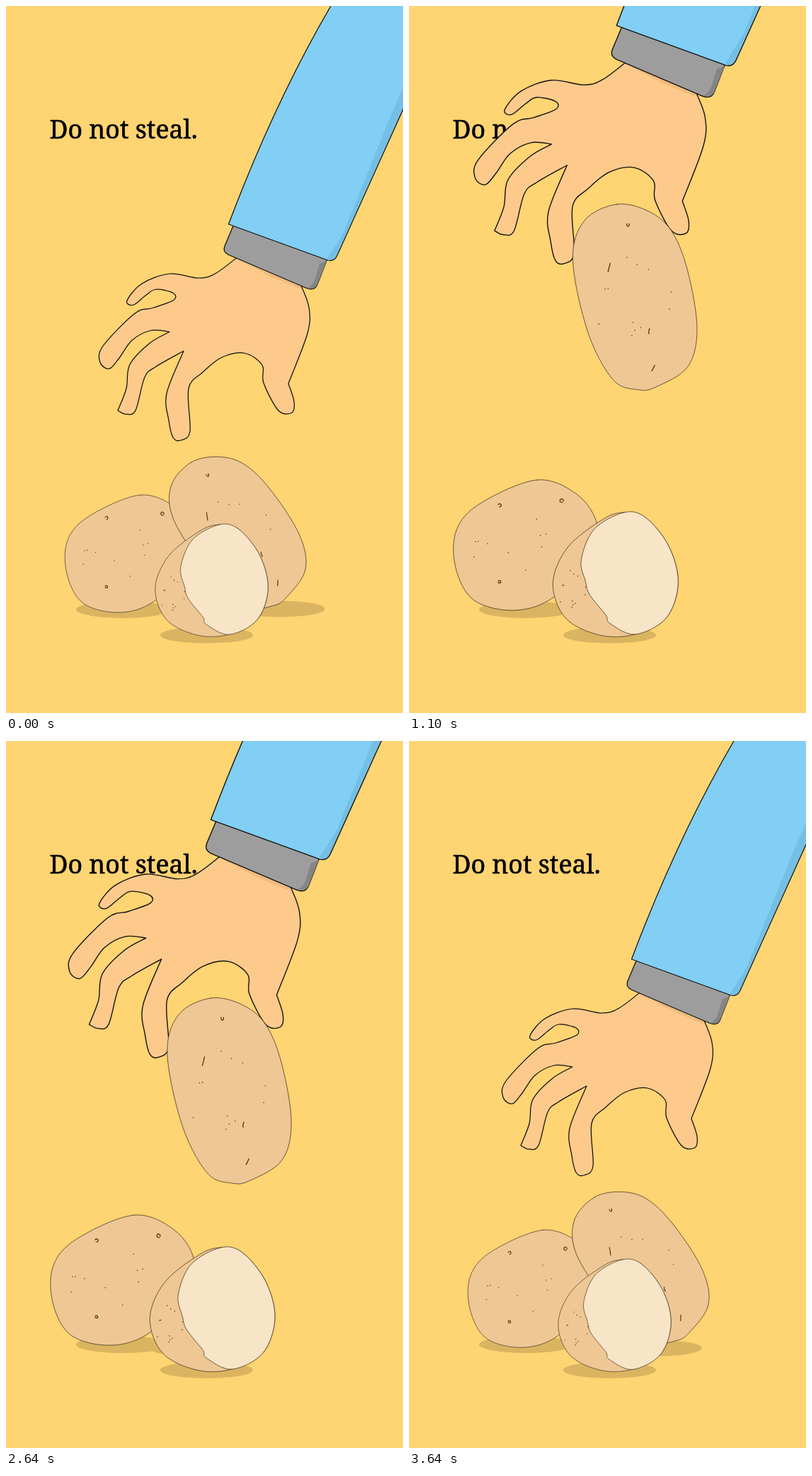
An HTML page that plays this animation: 561x998 px, repeating every 3.74 s.

```html
<!DOCTYPE html>
<html lang="en">
<head>
<meta charset="utf-8">
<title>Do not steal.</title>
<style>
html, body { margin: 0; height: 100%; overflow: hidden; background: #ffd472; }
svg { display: block; width: 100vw; height: 100vh; }
text { font: 35.7px "Noto Serif", "Liberation Serif", serif; stroke: #000; stroke-width: .6; }
path { stroke-linejoin: round; stroke-linecap: round; }
.ink { stroke: #111; stroke-width: 1.25; }
.peel { fill: #eec795; stroke: #4a3a22; stroke-width: .8; }
.cut { fill: #f8e4c6; }
.dots { fill: none; stroke: #4a2611; stroke-width: 1.5; }
.eye { fill: none; stroke: #5f2c10; stroke-width: 1.3; }
.shadow { fill: #dab460; }
</style>
</head>
<body>
<svg viewBox="0 0 561 998">
  <rect width="561" height="998" fill="#ffd472"/>
  <text x="61.5" y="187">Do not steal.</text>

  <ellipse class="shadow" cx="165" cy="852" rx="66" ry="12"/>
  <ellipse class="shadow" id="shade" rx="65.5" ry="11.5"/>
  <ellipse class="shadow" cx="283.5" cy="888" rx="65.5" ry="11.5"/>

  <g id="left">
    <path class="peel" data-closed data-p="181,669 238,690 266,732 258,775 205,834 150,853 92,839 66,793 67,740 101,702"/>
    <path class="dots"/>
    <path class="eye" d="M126,704a2.2,2.2 0 1 1 2,3M214,700a2.4,2.4 0 1 1 4,-1M214,700l3,1M126,812a2,2 0 1 1 3,2.5l-3,-.5"/>
  </g>

  <g id="arm">
    <path class="ink" fill="#fdca8c" data-p="335,348 297,377 272,384 231,378 192,392 171,416 180,422 198,408 212,400 236,405 237,415 208,426 182,434 137,480 133,503 146,512 160,497 178,472 205,458 231,460 231,460 203,476 175,506 170,540 158,571 158,571 169,576 183,571 196,524 212,509 251,487 251,487 227,547 230,585 236,609 247,613 260,600 258,540 278,517 305,496 337,490 362,507 364,532 385,571 404,574 407,558 399,533 399,533 426,462 428,425 415,390"/>
    <path fill="#efbb7d" d="M326,357L417,396L415,399L372,381Z"/>
    <path class="ink" fill="#9d9d9d" d="M322,308L309,339Q306,347 314,351L424,398Q436,403 440,393L454,357Z"/>
    <path fill="#858585" d="M443,364L453,360L440,393Q436,401 426,398Q434,394 437,384Z"/>
    <path class="ink" fill="#81cff4" d="M314.5,308L455,359Q464,361 468,352L660,-73L580,-222L459,0Q380,135 314.5,308Z"/>
    <path fill="#74bfe3" d="M453,358Q464,360 467,352L659,-73L645,-72L546,149L477,320Z"/>
  </g>

  <g id="held">
    <path class="peel" data-closed data-p="285,442 330,452 362,480 384,535 397,615 384,668 340,696 315,700 280,686 245,620 224,520 240,465"/>
    <path class="dots"/>
    <path class="eye" d="M299,469l.5,3q2,2 3,-1l0,-2M276,524L273,536M331,615Q329,618 330,622M338,666L334,674"/>
  </g>

  <g id="front">
    <path class="peel" data-closed data-p="304,715 274,725 225,764 204,815 222,864 270,888 320,887 364,864 381,815 368,763 335,722"/>
    <path class="dots"/>
    <path class="peel cut" data-closed data-p="304,715 262,739 244,782 250,812 256,831 279,860 284,871 320,887 364,864 381,815 368,763 335,722"/>
  </g>
</svg>
<script>
const $ = s => document.querySelector(s);
const clamp = v => Math.max(0, Math.min(1, v));
const ease = v => (v = clamp(v)) * v * (3 - 2 * v);

// Curve through points; a repeated point makes a corner.
function smooth(text, closed) {
  const p = text.split(' ').map(q => q.split(',').map(Number)), n = p.length;
  const at = i => closed ? p[(i + n) % n] : p[Math.max(0, Math.min(n - 1, i))];
  let d = 'M' + p[0];
  for (let i = 0; i < (closed ? n : n - 1); i++) {
    const [a, b, c, e] = [at(i - 1), at(i), at(i + 1), at(i + 2)];
    if (b + '' === c + '') continue;
    d += 'C' + [0, 1].map(k => b[k] + (c[k] - a[k]) / 6) + ' ' +
      [0, 1].map(k => c[k] - (e[k] - b[k]) / 6) + ' ' + c;
  }
  return closed ? d + 'Z' : d;
}
for (const el of document.querySelectorAll('[data-p]'))
  el.setAttribute('d', smooth(el.dataset.p, 'closed' in el.dataset));

// Seeded specks scattered in an ellipse.
function specks(id, count, cx, cy, rx, ry) {
  let seed = count, d = '';
  const random = () => (seed = seed * 16807 % 2147483647) / 2147483647;
  random();
  for (let i = 0; i < count; i++) {
    const r = Math.sqrt(random()), a = (i + random()) * 2.4;
    d += `M${cx + rx * r * Math.cos(a)},${cy + ry * r * Math.sin(a)}h.01`;
  }
  $(`#${id} .dots`).setAttribute('d', d);
}
specks('left', 10, 155, 758, 75, 70);
specks('held', 12, 312, 575, 62, 105);
specks('front', 12, 233, 825, 22, 50);

// Puts the anchor point (ax, ay) of a part at (x, y).
function place(id, ax, ay, x, y, scale, turn = 0) {
  $('#' + id).setAttribute('transform',
    `translate(${x} ${y}) rotate(${turn}) scale(${scale}) translate(${-ax} ${-ay})`);
}

function draw(now) {
  const t = now % 3740, back = t >= 2240;
  const step = back ? 14 - Math.floor((t - 2240) / 100) : Math.min(15, Math.floor(t / 100));
  const grab = clamp(step / 3), lift = clamp((step - 3) / 12);
  const settle = ease(lift / .45), straighten = clamp(lift * 4);

  const zoom = 1 + .047 * grab + .063 * ease(lift / .65);
  const armZoom = 1 + (zoom - 1) * .92;
  const x = 314.5 + 29.5 * grab - 62 * ease((lift - .08) / .38) + 38 * lift ** 3;
  const y = 308 + 29 * grab - 480 * lift ** 1.4 - 1460 * Math.max(0, lift - .58) ** 1.5;

  place('arm', 314.5, 308, x, y, armZoom);
  place('held', 318.5, 570,
    x + 31 * armZoom - 11 * (1 - grab) + 8 * grab * (1 - straighten),
    y + 347 * armZoom + 83 * (1 - grab) - 3 * grab * (1 - straighten),
    zoom * .914 - .017 * (1 - grab), -23 + 16 * grab + 7 * straighten);
  place('left', 128, 813, 142 - 7 * grab - 7 * settle, 820 - 7 * settle, zoom / 1.11);
  place('front', 293, 803, 291 + 2 * lift, 811.5 - grab - 7.5 * settle, zoom / 1.11);

  const slide = 80 * ease((lift - .25) / .17);
  place('shade', 0, 0, (back ? 348 : 385 - 14 * grab) - slide, back ? 857 : 851 + 13 * grab, 1);
}

const start = performance.now();
function tick() {
  draw(performance.now() - start);
  requestAnimationFrame(tick);
}
tick();
</script>
</body>
</html>
```
